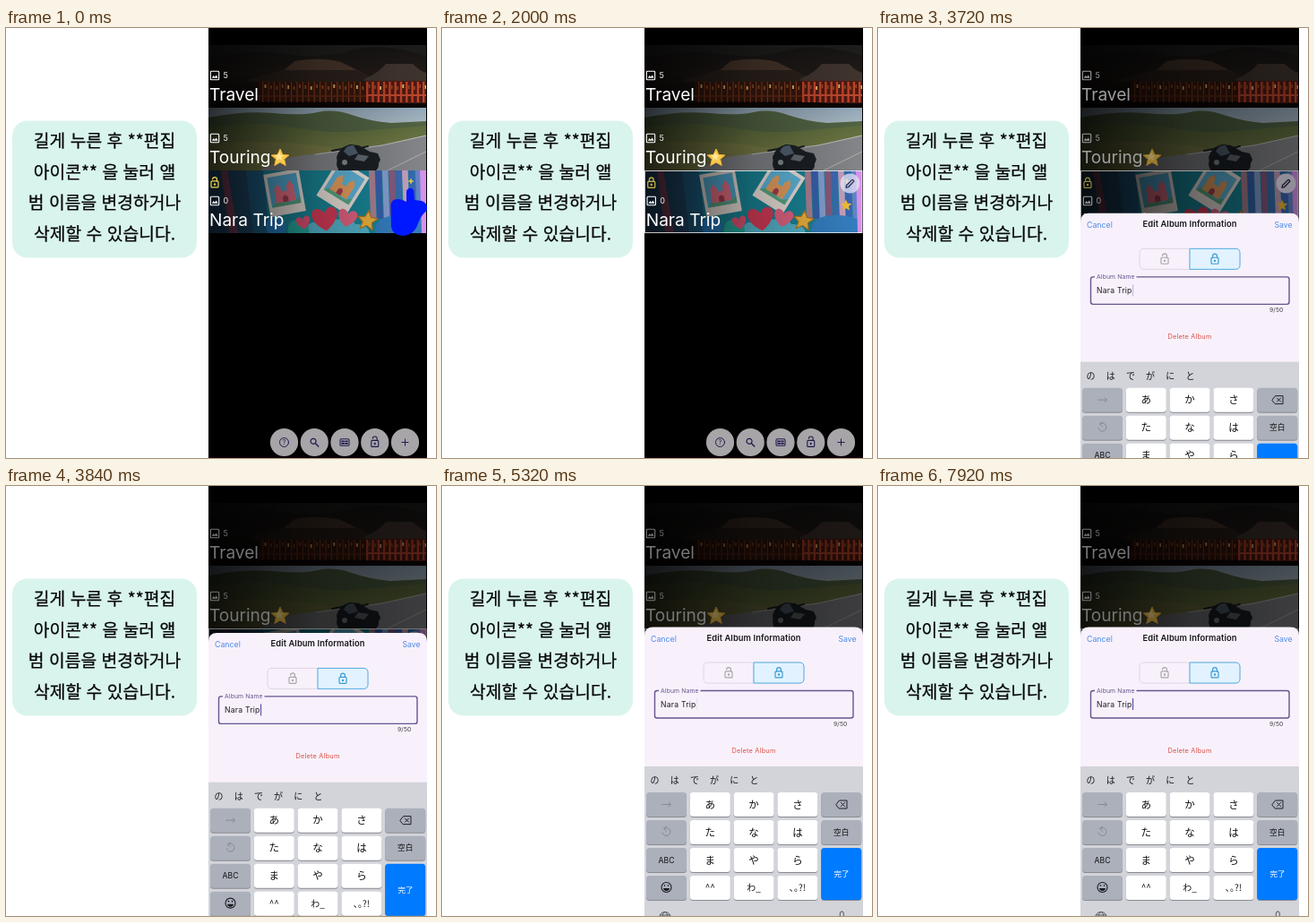
Animation of 480 by 480 pixels, one loop 8000 ms. Source, as an HTML page:

```html
<!DOCTYPE html>
<html lang="ko">
<head>
<meta charset="utf-8">
<title>Album editing guide</title>
<style>
  html, body { margin: 0; width: 100%; height: 100%; overflow: hidden; background: #fff; }
  svg { display: block; width: 100vw; height: 100vh; }
  text { font-family: Inter, "Noto Sans CJK JP", sans-serif; }
  .ko { font: 19.3px "Noto Sans CJK KR", "Noto Sans CJK", sans-serif; text-anchor: middle; fill: #050505; stroke: #050505; stroke-width: .25; }
  .name { font-size: 19.1px; fill: #fff; }
  .count { font-size: 9px; fill: #eee; }
  .mid { text-anchor: middle; }
  .jp { font-family: "Noto Sans CJK JP", "Noto Sans CJK", sans-serif; }
  .line { fill: none; stroke-linecap: round; stroke-linejoin: round; }
</style>
</head>
<body>
<svg viewBox="0 0 480 480" xmlns="http://www.w3.org/2000/svg">
  <defs>
    <clipPath id="phoneClip"><rect x="226" width="244" height="480"/></clipPath>
    <clipPath id="photoClip"><rect width="243" height="70"/></clipPath>
    <linearGradient id="shade">
      <stop offset="0" stop-color="#000" stop-opacity=".74"/>
      <stop offset=".5" stop-color="#000" stop-opacity=".25"/>
      <stop offset="1" stop-color="#000" stop-opacity="0"/>
    </linearGradient>
    <linearGradient id="night" x2="0" y2="1">
      <stop offset="0" stop-color="#151414"/><stop offset=".45" stop-color="#201a17"/><stop offset="1" stop-color="#0d0706"/>
    </linearGradient>
    <linearGradient id="sky" x2="0" y2="1">
      <stop offset="0" stop-color="#94a9ba"/><stop offset=".4" stop-color="#b4c0c6"/>
    </linearGradient>
    <linearGradient id="hill" x2="0" y2="1">
      <stop offset="0" stop-color="#5c6c3d"/><stop offset="1" stop-color="#83864a"/>
    </linearGradient>
    <path id="star" d="M0-10 2.9-3.6 9.8-3 4.6 1.6 6.2 8.5 0 4.9-6.2 8.5-4.6 1.6-9.8-3-2.9-3.6Z" stroke-linejoin="round"/>
    <path id="heart" d="M0 10C-14 1-12-9-6-9-2-9 0-5 0-4 0-5 2-9 6-9 12-9 14 1 0 10Z"/>
    <g id="lockBody"><rect x="-4" y="-1.6" width="8" height="7" rx="1"/><circle cy="2" r=".6"/></g>
    <g id="lock" class="line"><use href="#lockBody"/><path d="M-2.4-1.6v-1.8a2.4 2.4 0 0 1 4.8 0v1.8"/></g>
    <g id="unlock" class="line"><use href="#lockBody"/><path d="M2.4-1.6v-1.8a2.4 2.4 0 0 0-4.8-.3"/></g>
    <g id="pictureIcon">
      <rect x="-4.7" y="-4.7" width="9.4" height="9.4" rx="1" fill="none" stroke="#fff" stroke-width="1.1"/>
      <path d="M-3.3 2.8-1.3.1.1 1.7 1.7-.6 3.6 2.8Z" fill="#fff"/>
    </g>
  </defs>

  <rect width="480" height="480" fill="#fff"/>
  <rect x="7" y="103.500" width="206" height="153" rx="17" fill="#d9f4ed"/>
  <g id="caption"></g>

  <g clip-path="url(#phoneClip)">
    <rect x="226" width="244" height="480" fill="#000"/>
    <rect x="226" y="478.500" width="244" height="2" fill="#10020a"/>

    <g transform="translate(226 19)" clip-path="url(#photoClip)">
      <rect width="243" height="70" fill="url(#night)"/>
      <path d="M0 16Q40 4 84 10T160 6 243 12V0H0Z" fill="#1d1d1c"/>
      <path d="M56 36H178V63H56Z" fill="#35170d"/>
      <path d="M82 30 96 18Q124 13 148 19L172 31Z" fill="#47352a"/>
      <path d="M42 39Q66 33 82 28H166Q178 35 190 37L180 41H48Z" fill="#2b211b"/>
      <path d="M174 38Q190 31 198 21H228Q236 29 243 31V40H174Z" fill="#40342e"/>
      <path d="M176 40H243V65H176Z" fill="#4d1a12"/>
      <g id="pillars"></g>
      <path d="M52 57H176" stroke="#632816" stroke-width="1.500"/>
      <path d="M176 56H243" stroke="#bb4930" stroke-width="2"/>
      <path d="M0 64H190L243 67V70H0Z" fill="#0d0605"/>
      <rect width="243" height="70" fill="url(#shade)"/>
    </g>

    <g transform="translate(226 89)" clip-path="url(#photoClip)">
      <rect width="243" height="70" fill="url(#sky)"/>
      <path d="M0 11Q40 3 72 6T122 5 160 8 204 17L243 15V70H0Z" fill="#526444"/>
      <path d="M0 22Q50 14 96 22T170 26L243 20V70H0Z" fill="url(#hill)"/>
      <path d="M0 40Q70 34 140 45L150 70H0Z" fill="#7b7d47"/>
      <path d="M243 31 196 41 92 55 56 70H243Z" fill="#85868a"/>
      <path d="M243 31 194 42 120 52" class="line" stroke="#bfc0bb"/>
      <path d="M200 70 243 49" class="line" stroke="#b2b2ad"/>
      <g fill="#1b2025">
        <path d="M143 55Q147 43 159 41L168 42 180 49 189 51 192 58 186 70H145Z"/>
        <circle cx="151" cy="63" r="8"/><circle cx="183" cy="64" r="7"/>
        <path d="M138 48 149 46 158 42 170 45 178 43" class="line" stroke="#1b2025" stroke-width="2"/>
      </g>
      <path d="M151 49Q154 41 162 42L167 51 157 54Z" fill="#526071"/>
      <path d="M167 52 179 54 174 60 163 58Z" fill="#646b72"/>
      <circle cx="152" cy="61" r="3" fill="#858b8c"/>
      <rect width="243" height="70" fill="url(#shade)"/>
    </g>

    <g transform="translate(226 159)" clip-path="url(#photoClip)">
      <rect width="243" height="70" fill="#198698"/>
      <path d="M0 0H42L52 70H0Z" fill="#244f72"/>
      <path d="M14 0H21L33 70H23Z" fill="#874963"/>
      <path d="M42 0H61L68 70H50Z" fill="#1f6389"/>
      <g id="books"></g>
      <path d="M186 70Q184 55 202 51T243 56V70Z" fill="#347fc0"/>
      <path d="M236 0H243V70H238Z" fill="#d693ec"/>
      <path d="M108 70Q110 55 124 58 132 46 144 55 158 49 164 60 178 59 180 70Z" fill="#55b6cc"/>
      <circle cx="75" cy="63" r="11" fill="#287fc4"/>
      <path d="M89 70Q87 55 100 55T112 70Z" fill="#27a89f"/>
      <g id="polaroids"></g>
      <use href="#heart" transform="translate(106 58) scale(.75) rotate(-12)" fill="#e45377"/>
      <use href="#heart" transform="translate(130 54) scale(1.35) rotate(-8)" fill="#d83c59"/>
      <use href="#heart" transform="translate(155 53) rotate(12)" fill="#e66483"/>
      <use href="#star" transform="translate(177.500 56) scale(1.15) rotate(8)" fill="#edb53f" stroke="#ad7425"/>
      <use href="#star" transform="translate(225 39) scale(.65)" fill="#f3bd35"/>
      <path d="M226 9Q226 12 229 12 226 12 226 15 226 12 223 12 226 12 226 9Z" fill="#f6d447" stroke="#f6d447" stroke-width=".6"/>
      <rect width="243" height="70" fill="url(#shade)"/>
    </g>
    <g id="selection">
      <rect x="226.500" y="159.500" width="242.500" height="69" fill="none" stroke="#fff"/>
      <circle cx="455.500" cy="173.500" r="11" fill="#ebe4f7"/>
      <path d="M451 178.200 451.500 175.700 457.300 169.900Q458.200 169 459.200 170T459.200 171.800L453.400 177.700Z" class="line" stroke="#27213b" stroke-width="1.300"/>
    </g>
    <g id="albumLabels"></g>
    <use href="#star" x="306" y="145" fill="#f8c94d" stroke="#f3b53a"/>
    <use href="#star" transform="translate(305 143.500) scale(.5)" fill="#ffe695"/>
    <g id="toolbar"></g>

    <path id="hand" fill="#0018ff" d="M447 183a4.200 4.200 0 0 1 8.400 0L456 192 464 193Q471 196 470.500 203 463 209 460 218 456 231 443 232 431 231 430 222L429.500 200Q429 193 434 191.500 440 190 447 194Z"/>

    <rect id="dim" x="226" width="244" height="480" fill="#000"/>

    <g id="sheet">
      <path d="M226 500V167Q226 157.500 235.500 157.500H460.500Q470 157.500 470 167V500Z" fill="#f8f1fb"/>
      <text x="233" y="174" font-size="8.800" fill="#4c8bea">Cancel</text>
      <text x="348" y="173" font-size="9.300" font-weight="600" letter-spacing=".1" class="mid" fill="#17151a">Edit Album Information</text>
      <text x="462.500" y="174" font-size="8.700" text-anchor="end" fill="#4c8bea">Save</text>
      <g id="toggles"></g>
      <rect x="237.500" y="228.500" width="221.500" height="30.500" rx="2.500" fill="none" stroke="#65558f" stroke-width="1.400"/>
      <rect x="242" y="226" width="46.500" height="5" fill="#f8f1fb"/>
      <text x="244" y="231" font-size="6.800" letter-spacing=".15" fill="#65558f">Album Name</text>
      <text x="244" y="247" font-size="8.600" letter-spacing=".22" fill="#1d1b20">Nara Trip</text>
      <rect id="cursor" x="284" y="237" width="1.100" height="13" fill="#5547a5"/>
      <text x="452.500" y="268" font-size="6.700" letter-spacing=".2" text-anchor="end" fill="#3d3942">9/50</text>
      <text x="348" y="297.500" font-size="7.300" letter-spacing=".25" class="mid" fill="#dc5146">Delete Album</text>
    </g>
    <g id="keyboard"></g>
  </g>
</svg>

<script>
const $ = id => document.getElementById(id);
const fill = (id, items, draw) => { $(id).innerHTML = items.map(draw).join(""); };
const range = n => [...Array(n).keys()];
const clamp = v => Math.max(0, Math.min(1, v));
const ease = v => { v = clamp(v); return v * v * (3 - 2 * v); };
const rect = (x, y, w, h, color, rx = 0) => `<rect x="${x}" y="${y}" width="${w}" height="${h}" rx="${rx}" fill="${color}"/>`;
const line = (d, color, width = 1) => `<path class="line" d="${d}" stroke="${color}" stroke-width="${width}"/>`;

fill("caption", ["길게 누른 후 **편집", "아이콘** 을 눌러 앨", "범 이름을 변경하거나", "삭제할 수 있습니다."],
  (s, i) => `<text class="ko" x="110" y="${133.3 + i * 34.4}">${s}</text>`);

// Lit columns: dim along the hall, bright red on the near pavilion.
fill("pillars", range(29), i => {
  const near = i > 17;
  const x = near ? 176 + (i - 18) * 6.3 : 60 + i * 6.4;
  return rect(x, 41, near ? 2.4 : 1.2, 23, near ? "#c44327" : "#80381b")
    + rect(x + 2.6, 44 + i % 3, 1.8, 4, i % 4 ? "#8c4a22" : "#eeb766");
});

fill("books", ["#ae8294", "#385fae", "#86a0d2", "#8a5a80", "#3d6bb3", "#c7a1bf", "#3b67b4", "#6683c8"],
  (c, i) => `<path d="M${179 + i * 7.4} 0h6.600l2 54h-6.600Z" fill="${c}"/>`);

const polaroid = (x, y, angle, sky, castle) => `<g transform="translate(${x} ${y}) rotate(${angle})">
  ${rect(-20, -24, 40, 48, "#eee4dd", 1)}${rect(-16.5, -20, 33, 34, sky)}
  <path d="M-16 14Q-8 3 0 9T16 6V14Z" fill="#5baa80"/>
  <path d="M-11 10V-5L-7-11-3-5V-2H3V-7L7-13 11-7V10Z" fill="${castle}"/>
  <path d="M-3 10V5Q0 0 3 5V10Z" fill="#a74055"/></g>`;
$("polaroids").innerHTML = polaroid(85, 25, -10, "#54add5", "#ef7187") + polaroid(150, 18, 32, "#60b7dd", "#e9a15f");

fill("albumLabels", [["Travel", 5], ["Touring", 5], ["Nara Trip", 0]], ([name, count], i) => {
  const y = 53 + i * 70;
  return `<g id="label${i}"><use href="#pictureIcon" x="233" y="${y}"/>
    <text class="count" x="242.500" y="${y + 3.3}">${count}</text>
    <text class="name" x="227" y="${y + 28}">${name}</text></g>`;
});
$("label2").innerHTML += `<g stroke="#f2d64c" stroke-width="1.200">
  <use id="openBadge" href="#unlock" x="233" y="172.500"/><use id="lockBadge" href="#lock" x="233" y="173"/></g>`;

const ink = "#211a4c";
const toolIcons = [
  `<circle r="5" class="line" stroke="${ink}"/><text y="2.700" font-size="7.500" class="mid" fill="${ink}">?</text>`,
  `<circle cx="-1.200" cy="-1.200" r="3" class="line" stroke="${ink}" stroke-width="1.200"/>` + line("M1.200 1.200 4.500 4.500", ink, 1.4),
  `<rect x="-5" y="-3.800" width="10" height="7.600" rx="1.300" class="line" stroke="${ink}" stroke-width="1.100"/>`
    + line("M-3-1.200H-.8M1-1.200H3M-3 1.300H-.8M1 1.300H3", ink, 1.7),
  `<use href="#unlock" y="-.5" stroke="${ink}" stroke-width="1.100"/>`,
  line("M-3.600 0H3.600M0-3.600V3.600", ink)
];
fill("toolbar", toolIcons, (icon, i) =>
  `<g transform="translate(${310.5 + i * 33.75} 462.500)"><circle r="15.600" fill="#a7a5a8"/>${icon}</g>`);

// Lock selector halves: each has a plain and a selected look.
const half = (side, selected) => {
  const x = side ? 348 : 292, d = side ? 1 : -1;
  const color = selected ? "#3b9bd6" : "#aaa5ad";
  const edge = `M348 197H${348 + d * 51}q${d * 5} 0 ${d * 5} 5V215q0 5 ${-d * 5} 5H348Z`;
  return `<g id="${selected ? "on" : "off"}${side}">
    <path d="${edge}" fill="${selected ? "#e2f3ff" : "#f8f1fb"}" stroke="${selected ? "#55ade2" : "#ded7e1"}"/>
    <use href="#${side ? "lock" : "unlock"}" x="${x + 28}" y="208.500" stroke="${color}" stroke-width="1.200"/></g>`;
};
$("toggles").innerHTML = half(0, false) + half(1, false) + half(0, true) + half(1, true);

const columns = [228, 276.8, 325.6, 374.4, 423.2];
const keyRows = [["", "あ", "か", "さ", ""], ["", "た", "な", "は", "空白"], ["ABC", "ま", "や", "ら", null], ["", "^^", "わ_", "､｡?!", null]];
const key = (x, y, h, color) => rect(x, y + 1, 45, h, "#898b90", 3.5) + rect(x, y, 45, h, color, 3.5);
const keys = keyRows.flatMap((row, r) => row.map((label, c) => {
  if (label === null) return "";
  const y = 342 + r * 31, x = columns[c], side = c === 0 || c === 4;
  const size = side ? 8.6 : r === 3 ? 10 : 11.5;
  return key(x, y, 27, side ? "#abb0bb" : "#fff")
    + `<text class="mid ${label === "ABC" ? "" : "jp"}" x="${x + 22.5}" y="${y + 13.5 + size * .36}" font-size="${size}" fill="#111">${label}</text>`;
})).join("");
const hints = [..."のはでがにと"].map((s, i) =>
  `<text class="mid jp" x="${237.5 + i * 22.2}" y="332" font-size="10" fill="#17171a">${s}</text>`).join("");
$("keyboard").innerHTML = rect(226, 313, 244, 190, "#d2d4da") + hints + keys
  + key(423.2, 404, 58, "#007aff")
  + `<text class="mid jp" x="446" y="436" font-size="8.500" fill="#fff">完了</text>`
  + line("M245.500 355.500H255.500M253 353 255.500 355.500 253 358", "#858b95")
  + line("M247.500 382.500A4.500 4.500 0 1 1 246 387M250.500 380 247.500 382.500 250.500 385", "#858b95")
  + line("M440 355.500 443.500 351H452V360H443.500ZM445.500 353.500 449.500 357.500M449.500 353.500 445.500 357.500", "#1e2024")
  + `<circle cx="250.500" cy="448" r="5.500" class="line" stroke="#17191c" stroke-width="1.100"/>
     <path d="M247 449H254Q253.500 452 250.500 452T247 449Z" fill="#17191c"/>
     <circle cx="248.500" cy="446" r=".8"/><circle cx="252.500" cy="446" r=".8"/>`
  + `<circle cx="249" cy="482" r="6.500" class="line" stroke="#555960"/><ellipse cx="249" cy="482" rx="3" ry="6.500" class="line" stroke="#555960"/>`
  + line("M243.500 479H254.500", "#555960")
  + `<rect x="444.300" y="475" width="4" height="9" rx="2" class="line" stroke="#555960"/>`;

const LOOP = 8000;
const PULSE = [[520, 1], [760, 1.27], [1060, .95], [1320, 1]];
const show = (id, opacity) => $(id).setAttribute("opacity", opacity);
const shift = (id, x, y) => $(id).setAttribute("transform", `translate(${x} ${y})`);

function tween(points, t) {
  const i = points.findIndex(p => t < p[0]);
  if (i === 0) return points[0][1];
  if (i < 0) return points[points.length - 1][1];
  const [t0, a] = points[i - 1], [t1, b] = points[i];
  return a + (b - a) * ease((t - t0) / (t1 - t0));
}

// Remaining share of the way for a critically damped spring.
const settle = (t, speed) => t <= 0 ? 1 : (1 + speed * t) * Math.exp(-speed * t);

function render(t) {
  const scale = tween(PULSE, t);
  $("hand").setAttribute("transform", `translate(450 205.500) scale(${scale}) translate(-450 -205.500)`);
  show("hand", 1 - clamp((t - 1330) / 110));

  const selected = ease((t - 1840) / 240);
  show("selection", selected);
  show("openBadge", 1 - selected);
  show("lockBadge", selected);
  shift("label2", selected, 0);

  const opened = t - 3560;
  show("dim", .54 * ease(opened / 250));
  shift("sheet", 0, 323 * settle(opened, .0208));
  shift("keyboard", 0, 167 * settle(opened, .0136));
  show("cursor", clamp(.5 + .9 * Math.cos(t / 500 * Math.PI)));

  const unlocked = t >= 5500 && t < 7100;
  show("on0", unlocked ? 1 : 0);
  show("on1", unlocked ? 0 : 1);
}

const start = performance.now();
function tick() {
  render((performance.now() - start) % LOOP);
  requestAnimationFrame(tick);
}
tick();
</script>
</body>
</html>
```
